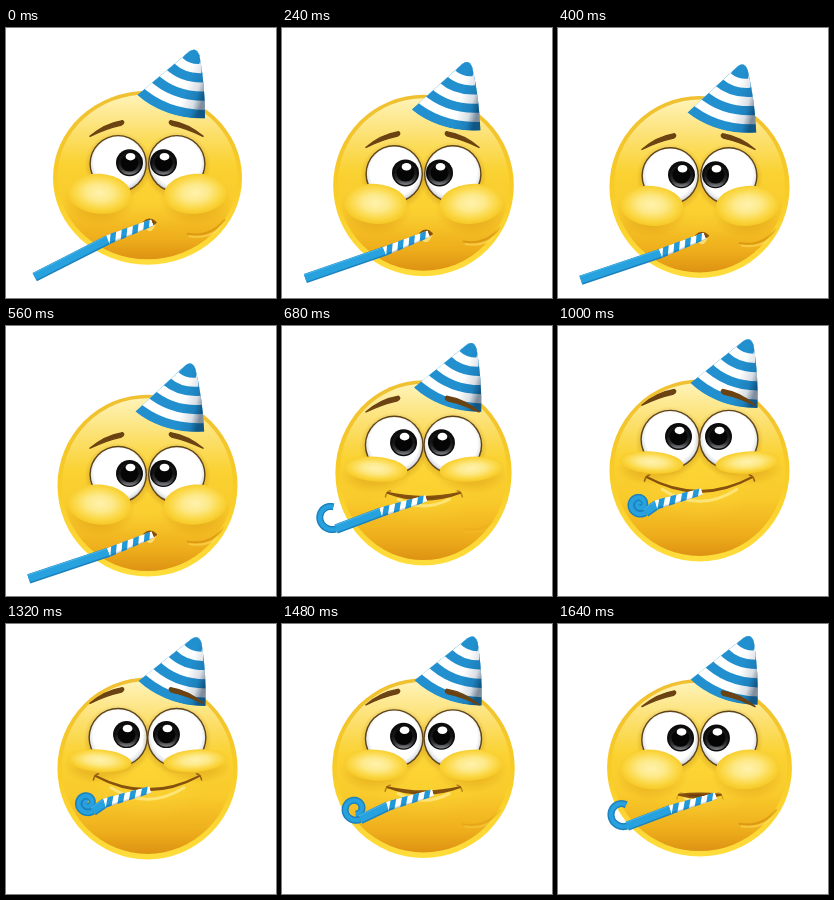
An HTML page with a canvas for the animation above (1680 ms loop, 270 by 270 pixels).

```html
<!DOCTYPE html>
<html lang="en">
<head>
<meta charset="utf-8">
<title>Party face</title>
<style>
html, body { margin: 0; width: 100%; height: 100%; overflow: hidden; background: #fff; }
canvas { display: block; width: 100vw; height: 100vh; }
</style>
</head>
<body>
<canvas id="stage"></canvas>
<script>
const LOOP = 1680, STEP = 40, SIZE = 270, TAU = Math.PI * 2;
const MID = 141.5, EYE_GAP = 29.3;
const canvas = document.getElementById('stage');
const ctx = canvas.getContext('2d');
const scale = window.devicePixelRatio || 1;
canvas.width = canvas.height = SIZE * scale;

const progress = (a, b, t) => Math.min(1, Math.max(0, (t - a) / (b - a)));
const ease = (a, b, t) => { const u = progress(a, b, t); return u * u * (3 - 2 * u); };
const bump = (a, b, t) => Math.sin(Math.PI * progress(a, b, t));
const decay = (life, t) => Math.exp(-t / life);

// Blow (head sinks), let go (head springs up, blower rolls in), rest, inhale.
function poseAt(t) {
  const release = ease(560, 720, t), inhale = ease(1280, 1680, t);
  const puff = 1 - release + inhale;
  const nod = (1 - .15 * decay(150, t)) * (1 - release) + .15 * inhale;
  const sink = (1 - .66 * decay(170, t)) * (1 - release) - .1 * bump(700, 860, t) - .05 * inhale;
  const squash = 4.5 * decay(90, t) + 2.5 * inhale - 2 * bump(600, 800, t);
  const smile = ease(560, 760, t) * (1 - .7 * inhale);
  const curl = ease(560, 800, t) * (1 - .5 * inhale);

  const cy = 144.5 + 15.5 * sink, eyeY = cy - 31 + 20 * nod;
  const tubeY = cy + 21 + 28 * nod + 3 * inhale;
  const sag = 34 * smile * smile - 6, open = 6 - 5 * smile;
  return {
    puff, smile, eyeY,
    face: { cy, rx: 90 + squash, ry: 91 - .9 * squash },
    hat: { x: 199.5 - 1.5 * sink, y: 80 + 24 * sink, tilt: -4.5 * sink },
    browY: eyeY - 49 + 8 * nod,
    mouth: { x: MID + 2.5 * nod, y: tubeY - (sag + open) / 2, w: 6 + 47 * smile, sag, open },
    tube: { x: 144 + 3 * nod + 14 * inhale, y: tubeY, angle: 2.86 - .1 * nod },
    ribbon: {
      angle: 2.82 - .15 * decay(90, t) - .3 * curl ** 3,
      length: 82 - 68 * curl + 3 * sink,
      radius: 13.5 - 3 * ease(840, 1000, t) * (1 - inhale),
      turn: 10 * curl ** 1.4
    }
  };
}

function addStops(gradient, stops) {
  stops.forEach(([p, c]) => gradient.addColorStop(p, c));
  return gradient;
}
const radial = (x, y, r, ...stops) => addStops(ctx.createRadialGradient(x, y, 0, x, y, r), stops);
const linear = (x0, y0, x1, y1, ...stops) => addStops(ctx.createLinearGradient(x0, y0, x1, y1), stops);

function oval(x, y, rx, ry, fill) {
  ctx.beginPath();
  ctx.ellipse(x, y, rx, ry, 0, 0, TAU);
  ctx.fillStyle = fill;
  ctx.fill();
}

function curve(x0, y0, cx, cy, x1, y1, color, width) {
  ctx.beginPath();
  ctx.moveTo(x0, y0);
  ctx.quadraticCurveTo(cx, cy, x1, y1);
  ctx.strokeStyle = color;
  ctx.lineWidth = width;
  ctx.lineCap = 'round';
  ctx.stroke();
}

// Oval that fades to nothing at its edge.
function glow(x, y, rx, ry, rgb, alpha) {
  ctx.save();
  ctx.translate(x, y);
  ctx.scale(rx, ry);
  oval(0, 0, 1, 1, radial(0, 0, 1, [0, `rgba(${rgb},${alpha})`],
    [.5, `rgba(${rgb},${alpha * .75})`], [1, `rgba(${rgb},0)`]));
  ctx.restore();
}

function bothSides(paint) {
  paint(-1);
  paint(1);
}

function drawFace({ cy, rx, ry }) {
  oval(MID, cy, rx, ry, linear(0, cy - ry, 0, cy + ry, [0, '#efc032'], [.5, '#f8cb26'], [1, '#ffdd3c']));
  oval(MID, cy - 1, rx - 4.5, ry - 4.5, linear(0, cy - ry, 0, cy + ry,
    [.02, '#fff3b8'], [.22, '#fce173'], [.42, '#fad232'], [.65, '#f9ca2b'], [.85, '#eeae1c'], [.98, '#dc9012']));
  glow(MID, cy, rx * .7, ry * .6, '255,220,60', .35);
}

function drawEyes(y, smile) {
  const r = 28 + smile;
  bothSides(side => {
    const x = MID + side * EYE_GAP;
    glow(x, y + 2, r + 6, r + 6, '150,85,0', .7);
    oval(x, y, r + .8, r + .8, '#5c4318');
    oval(x, y, r - .6, r - .6, radial(x, y - 2, r + 2, [0, '#fff'], [.8, '#fff'], [.92, '#e3e5e8'], [1, '#a9abb0']));
  });
  const py = y - 1 - 2 * smile, pr = 13.5;
  bothSides(side => {
    const x = MID - 1 + side * (17 + 3 * smile);
    oval(x, py, pr, pr, '#0c0c0d');
    oval(x, py + 1, pr - 2, pr - 2.4, linear(0, py, 0, py + pr, [0, '#151516'], [.5, '#333436'], [1, '#9a9b9e']));
    oval(x, py, pr * .66, pr * .64, '#050506');
    oval(x + 1, py - pr * .45, pr * .36, pr * .28, '#fff');
  });
}

function drawCheeks({ cy, rx, ry }, eyeY, puff) {
  const y = eyeY + 23 + 7 * puff, h = 11 + 9 * puff;
  ctx.save();
  ctx.beginPath();
  ctx.ellipse(MID, cy, rx - 3, ry - 3, 0, 0, TAU);
  ctx.clip();
  bothSides(side => {
    const x = MID + side * 48;
    glow(x, y + 6, 36, h + 6, '190,115,0', .3);
    ctx.save();
    ctx.translate(x, y);
    ctx.rotate(side * -.08);
    ctx.scale(32, h);
    oval(0, 0, 1, 1, radial(0, -.05, 1, [0, '#fff2ac'], [.4, '#fdea8c'], [.8, '#fbd743'], [1, '#f7cb2b']));
    ctx.restore();
  });
  ctx.globalAlpha = puff;
  curve(MID + 40, cy + 56, MID + 62, cy + 60, MID + 77, cy + 42, 'rgba(190,115,0,.4)', 2);
  curve(MID + 42, cy + 58.5, MID + 64, cy + 62, MID + 78, cy + 45, 'rgba(255,230,110,.45)', 2);
  ctx.restore();
}

function drawBrows(y) {
  bothSides(side => {
    const x = d => MID - 1 + side * d;
    ctx.beginPath();
    ctx.moveTo(x(57), y + 15);
    ctx.quadraticCurveTo(x(42), y + 2, x(24), y - 1);
    ctx.quadraticCurveTo(x(21), y + 1, x(25), y + 3.5);
    ctx.quadraticCurveTo(x(41), y + 7, x(57), y + 15);
    ctx.fillStyle = ctx.strokeStyle = '#6b4212';
    ctx.lineWidth = 1.3;
    ctx.lineJoin = 'round';
    ctx.fill();
    ctx.stroke();
  });
}

function drawMouth({ x, y, w, sag, open }, smile) {
  const low = y + sag + open * 2;
  curve(x - w * .7, y + sag * .3 + 4, x, low + 6, x + w * .7, y + sag * .3 + 4, 'rgba(255,236,140,.75)', 3);
  ctx.beginPath();
  ctx.moveTo(x - w, y);
  ctx.quadraticCurveTo(x, y + sag, x + w, y);
  ctx.quadraticCurveTo(x, low, x - w, y);
  ctx.fillStyle = '#6f3c08';
  ctx.strokeStyle = '#85510f';
  ctx.lineWidth = 2;
  ctx.lineJoin = 'round';
  ctx.fill();
  ctx.stroke();
  ctx.globalAlpha = smile;
  bothSides(side => {
    const end = x + side * w;
    curve(end - side * 3, y - 2, end + side, y - 1, end + side * 2, y + 4, '#94600f', 1.6);
  });
  ctx.globalAlpha = 1;
}

function drawRibbon(x, y, { angle, length, radius, turn }) {
  const hx = Math.cos(angle), hy = Math.sin(angle);
  const ex = x + hx * length, ey = y + hy * length;
  const cx = ex - hy * radius, cy = ey + hx * radius;
  const trace = (offset, width, color, spiral) => {
    ctx.beginPath();
    if (spiral) {
      for (let a = 0; a < turn; a += .1) {
        const d = Math.max(radius - a - offset, 0), q = angle - Math.PI / 2 + a;
        ctx.lineTo(cx + Math.cos(q) * d, cy + Math.sin(q) * d);
      }
    } else {
      ctx.moveTo(x - hy * offset, y + hx * offset);
      ctx.lineTo(ex - hy * offset, ey + hx * offset);
    }
    ctx.lineWidth = width;
    ctx.strokeStyle = color;
    ctx.stroke();
  };
  ctx.lineCap = 'butt';
  for (const spiral of [true, false]) {
    const w = spiral ? 7 : 9.5;
    trace(0, w, '#1c82bd', spiral);
    trace(.5, w - 2, '#27a2df', spiral);
    trace(w / 2 - .8, 1, spiral ? '#1a78b2' : '#4bb7ea', spiral);
  }
}

function drawBlower(tube, ribbon) {
  const len = 47;
  drawRibbon(tube.x + Math.cos(tube.angle) * len, tube.y + Math.sin(tube.angle) * len, ribbon);
  ctx.save();
  ctx.translate(tube.x, tube.y);
  ctx.rotate(tube.angle);
  ctx.beginPath();
  ctx.moveTo(0, -3.5);
  ctx.lineTo(len + 1, -4.8);
  ctx.lineTo(len + 1, 4.8);
  ctx.lineTo(0, 3.5);
  ctx.closePath();
  ctx.clip();
  ctx.fillStyle = '#fff';
  ctx.fill();
  ctx.fillStyle = '#2298d6';
  for (let x = 4; x < len + 8; x += 12) {
    ctx.beginPath();
    ctx.moveTo(x + 2, -5);
    ctx.lineTo(x + 8, -5);
    ctx.lineTo(x + 3, 5);
    ctx.lineTo(x - 3, 5);
    ctx.fill();
  }
  ctx.fillStyle = linear(0, -5, 0, 5, [0, 'rgba(0,50,90,.4)'], [.3, 'rgba(0,50,90,0)'],
    [.85, 'rgba(0,50,90,0)'], [1, 'rgba(0,50,90,.2)']);
  ctx.fillRect(0, -5, len + 1, 10);
  ctx.restore();
}

function drawHat({ x, y, tilt }) {
  const tipX = -7, tipY = -67, bands = 7;
  ctx.save();
  ctx.translate(x, y);
  ctx.rotate(tilt * Math.PI / 180);
  ctx.beginPath();
  ctx.moveTo(-67, -23);
  ctx.lineTo(-14, -65);
  ctx.quadraticCurveTo(-7, -70, -4, -61);
  ctx.quadraticCurveTo(1, -30, 0, 2);
  ctx.quadraticCurveTo(-42, 2, -67, -23);
  ctx.clip();
  for (let k = bands; k > 0; k--) {
    const s = (k + .6) / (bands + .6);
    const px = v => tipX + (v - tipX) * s, py = v => tipY + (v - tipY) * s;
    ctx.beginPath();
    ctx.moveTo(tipX - 3, tipY - 9);
    ctx.lineTo(px(-73), py(-28));
    ctx.quadraticCurveTo(px(-42), py(3), px(6), py(3));
    ctx.lineTo(tipX + 9, tipY - 5);
    ctx.fillStyle = k % 2 ? '#2290cf' : '#fff';
    ctx.fill();
  }
  ctx.fillStyle = linear(-46, -44, 2, -28, [0, 'rgba(0,40,80,0)'], [.6, 'rgba(0,40,80,0)'],
    [.85, 'rgba(0,40,80,.15)'], [1, 'rgba(0,30,60,.5)']);
  ctx.fillRect(-75, -75, 85, 80);
  ctx.restore();
}

function draw(t) {
  const p = poseAt(t);
  ctx.setTransform(scale, 0, 0, scale, 0, 0);
  ctx.fillStyle = '#fff';
  ctx.fillRect(0, 0, SIZE, SIZE);
  drawFace(p.face);
  drawEyes(p.eyeY, p.smile);
  drawCheeks(p.face, p.eyeY, p.puff);
  drawMouth(p.mouth, p.smile);
  drawBlower(p.tube, p.ribbon);
  drawHat(p.hat);
  drawBrows(p.browY);
}

const start = performance.now();
function tick() {
  const t = (performance.now() - start) % LOOP;
  draw(Math.floor(t / STEP) * STEP);
  requestAnimationFrame(tick);
}
tick();
</script>
</body>
</html>
```
